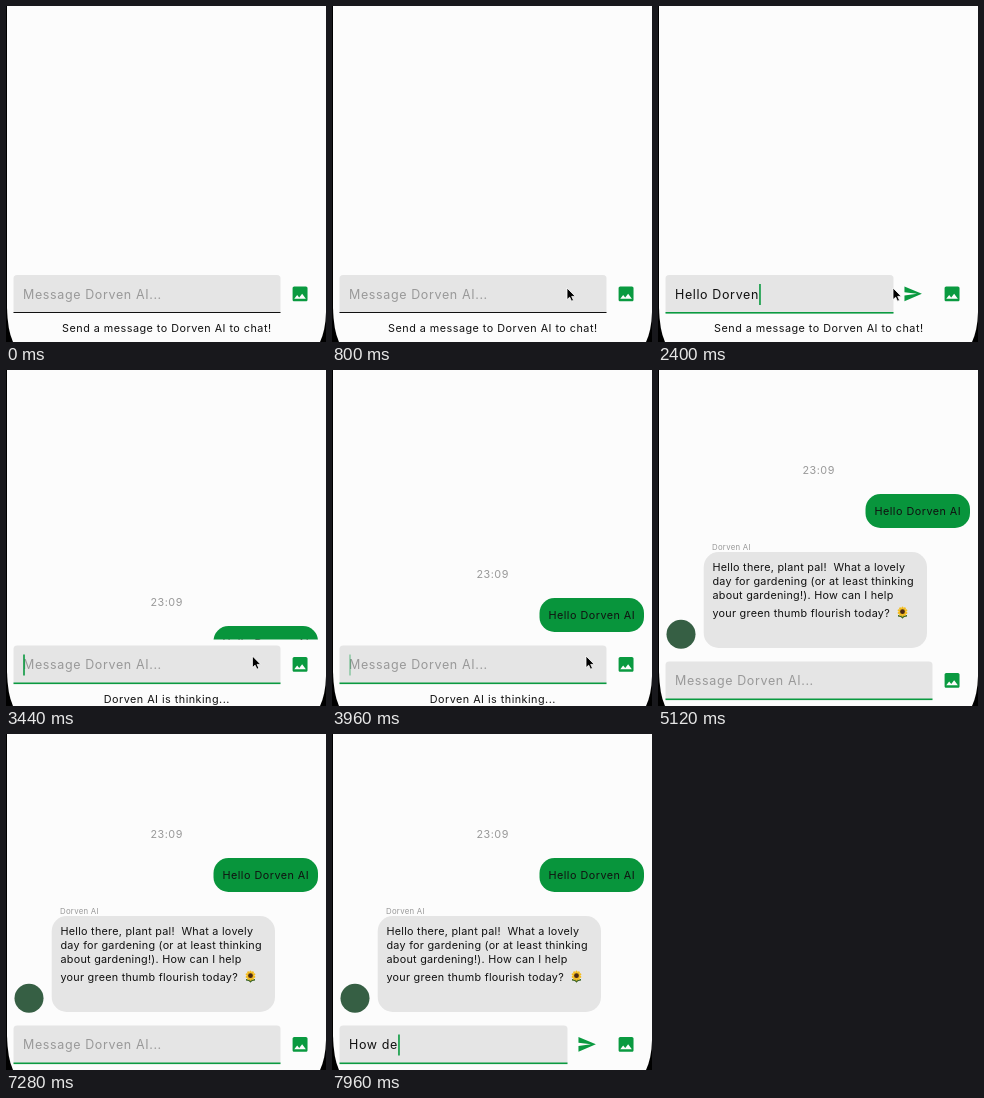
Animation of 320 by 336 pixels, one loop 8 s. Source, as an HTML page:

```html
<!DOCTYPE html>
<html lang="en">
<head>
<meta charset="utf-8">
<title>Chat</title>
<style>
html, body { margin: 0; width: 100%; height: 100%; overflow: hidden; background: #000; }
svg { display: block; width: 100%; height: 100%; font-family: Inter, Roboto, sans-serif; }
text { white-space: pre; font-size: 10.8px; letter-spacing: .48px; fill: #111; }
.mid { text-anchor: middle; }
.grey { fill: #999; }
.input { font-size: 12.5px; letter-spacing: .62px; }
.reply text { letter-spacing: .26px; }
.reply .name { font-size: 7.8px; }
.green { fill: #0a9a40; }
.bubble { fill: #08953c; }
.box { fill: #e5e5e5; }
</style>
</head>
<body>
<svg viewBox="0 0 320 336">
  <defs><clipPath id="listClip"><rect id="listArea" width="320" height="263"/></clipPath></defs>
  <path fill="#fcfcfc" d="M1 0V302Q1.5 324 7 336H314Q319.6 324 320 306V0Z"/>

  <g clip-path="url(#listClip)">
    <g id="list">
      <text class="mid grey" x="160.7" y="207.7">23:09</text>
      <rect class="bubble" x="207.5" y="228" width="104.5" height="34" rx="15"/>
      <text x="216.5" y="249">Hello Dorven AI</text>
      <g class="reply" id="reply">
        <text class="name grey" x="54" y="283.5">Dorven AI</text>
        <circle cx="23" cy="368.2" r="14.5" fill="#365f44"/>
        <rect class="box" x="45.7" y="286" width="223.3" height="96" rx="15"/>
        <text x="54.5" y="305">Hello there, plant pal!  What a lovely</text>
        <text x="54.5" y="319">day for gardening (or at least thinking</text>
        <text x="54.5" y="332.8">about gardening!). How can I help</text>
        <text x="54.5" y="351">your green thumb flourish today?</text>
        <g id="flower" transform="translate(244.5 346.5)">
          <path d="M0 1V5.2M-4.4 3.4Q-1.5 3 0 5Q1.5 3 4.4 3.4" fill="none" stroke="#3d6626" stroke-width="1.6"/>
        </g>
      </g>
    </g>
  </g>

  <g id="bar">
    <path class="box" id="field"/>
    <rect id="line" x="7.5" y="306"/>
    <text class="input" id="entry" x="17" y="292.8"></text>
    <rect class="green" id="caret" y="278" width="1.6" height="21"/>
    <path class="green" id="send" transform="translate(244.8 277.9) scale(.83)" d="M2 21L23 12 2 3V10L17 12 2 14Z"/>
    <path class="green" transform="translate(284.1 277.9) scale(.83)" d="M21 19V5c0-1.1-.9-2-2-2H5c-1.1 0-2 .9-2 2v14c0 1.1.9 2 2 2h14c1.1 0 2-.9 2-2zM8.5 13.5l2.5 3L14.5 12l4.5 6H5z"/>
    <text class="mid" id="caption" x="160.8" y="326"></text>
  </g>

  <path id="pointer" d="M0 0V11.6L2.7 9.2L4.5 13.2L6.5 12.3L4.7 8.4H8.3Z" fill="#000" stroke="#fff" stroke-width=".8" stroke-linejoin="round"/>
</svg>
<script>
const $ = id => document.getElementById(id);
const LOOP = 8000, FOCUS = 880, SENT = 3320, ANSWERED = 4400;
const HINT = 'Message Dorven AI...';

const keys = (text, start, step) => [...text].map((ch, i) => ({ ch, at: start + i * step }));
const first = [...keys('Hello Dorven', 1160, 109), ...keys(' AI', 2560, 110)];
const second = keys('How de', 7340, 115);

// Pointer track: time, x, y
const track = [
  [280, 262, 338], [700, 235, 282], [2800, 235, 282], [3140, 246, 286],
  [3400, 246, 286], [3700, 254, 286], [4500, 254, 286], [4900, 322, 300],
  [4901, 285, 338], [6200, 285, 338], [6440, 273, 318], [6520, 273, 318], [6800, 280, 338]
];

const clamp = v => Math.max(0, Math.min(1, v));
const smooth = v => v * v * (3 - 2 * v);
const easeOut = v => 1 - (1 - v) ** 3;
const progress = (t, start, length) => clamp((t - start) / length);

function pointerAt(t) {
  const i = track.findIndex(p => p[0] > t);
  if (i < 1) return (i ? track[track.length - 1] : track[0]).slice(1);
  const [a, b] = [track[i - 1], track[i]];
  const k = smooth((t - a[0]) / (b[0] - a[0]));
  return [a[1] + (b[1] - a[1]) * k, a[2] + (b[2] - a[2]) * k];
}

function caretOpacity(t, shownAt) {
  if (t < FOCUS) return 0;
  const u = (190 + Math.max(0, t - shownAt)) % 1000;
  return Math.min(progress(u, 90, 100), 1 - progress(u, 500, 100));
}

function setText(el, value) {
  if (el.textContent !== value) el.textContent = value;
}

function drawBar(t) {
  const typed = (t < SENT ? first : second).filter(k => k.at <= t);
  const value = typed.map(k => k.ch).join('');
  const focused = t >= FOCUS;
  const right = value ? 235.5 : 274.5;
  const entry = $('entry');

  $('field').setAttribute('d', `M7.5 307V272.5Q7.5 269 11 269H${right - 3.5}Q${right} 269 ${right} 272.5V307Z`);
  const line = $('line');
  line.setAttribute('width', right - 7.5);
  line.setAttribute('height', focused ? 1.6 : 1);
  line.setAttribute('fill', focused ? '#0a9a40' : '#111');

  setText(entry, value || HINT);
  entry.classList.toggle('grey', !value);
  $('send').style.display = value ? '' : 'none';

  const shownAt = value ? typed[typed.length - 1].at : t < SENT ? FOCUS : 3590;
  $('caret').setAttribute('x', 17.2 + (value ? entry.getComputedTextLength() : 0));
  $('caret').setAttribute('opacity', caretOpacity(t, shownAt));
  setText($('caption'), t < SENT ? 'Send a message to Dorven AI to chat!'
    : t < ANSWERED ? 'Dorven AI is thinking...' : '');
}

function draw(t) {
  const drop = t < SENT ? 0 : t < ANSWERED ? 6.5 : 22.5;
  const sent = easeOut(progress(t, SENT + 40, 300));
  const answered = easeOut(progress(t, ANSWERED, 320));
  const shift = drop - 6.5 + 72 * (1 - sent) - 120 * answered;

  $('list').setAttribute('transform', `translate(0 ${shift})`);
  $('list').style.display = t < SENT ? 'none' : '';
  $('reply').style.display = t < ANSWERED ? 'none' : '';
  $('listArea').setAttribute('height', 263 + drop);
  $('bar').setAttribute('transform', `translate(0 ${drop})`);
  drawBar(t);
  $('pointer').setAttribute('transform', `translate(${pointerAt(t)})`);
}

function addFlower() {
  const add = (tag, attrs) => {
    const el = document.createElementNS($('flower').namespaceURI, tag);
    for (const name in attrs) el.setAttribute(name, attrs[name]);
    $('flower').append(el);
  };
  for (let i = 0; i < 10; i++)
    add('ellipse', { cy: -3.2, rx: 1.2, ry: 1.9, fill: '#f5bd1f', transform: `translate(0 -.8) rotate(${i * 36})` });
  add('circle', { cy: -.8, r: 2.4, fill: '#4a2a16' });
}

addFlower();
const begin = performance.now();
function tick() {
  draw((performance.now() - begin) % LOOP);
  requestAnimationFrame(tick);
}
tick();
</script>
</body>
</html>
```
